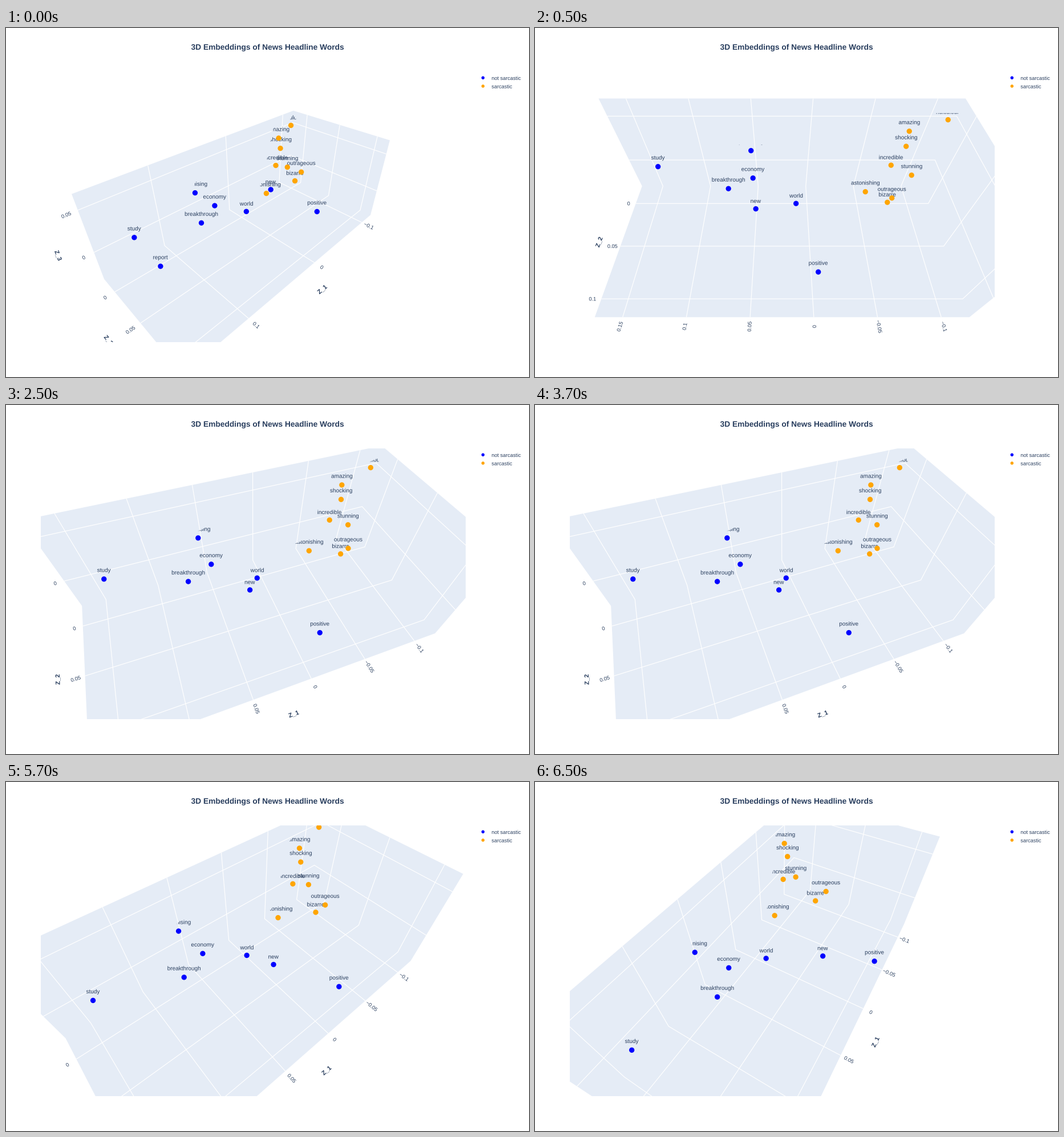
A matplotlib script for the animation above (8 s loop, 917x611 px).

```python
import math

import matplotlib.pyplot as plt
import numpy as np
from matplotlib.animation import FuncAnimation
from matplotlib.patches import Circle, PathPatch, Polygon
from matplotlib.path import Path
from matplotlib.textpath import TextPath
from matplotlib.transforms import Affine2D

WIDTH, HEIGHT, DPI = 917, 611, 64
INK, WALL = "#2a3f5f", "#e5ecf6"
BLUE, ORANGE = "#0000ff", "#ffa500"

# Viewport of the 3D scene and a pinhole camera with a 45 degree field of view.
LEFT, RIGHT, TOP, BOTTOM = 61, 806, 76.3, 550
VIEWPORT = np.array([(LEFT, TOP), (RIGHT, TOP), (RIGHT, BOTTOM), (LEFT, BOTTOM)])
MIDDLE = np.array([433.2, 312.9])
FOCAL = (BOTTOM - TOP) / 2 / math.tan(math.radians(22.5))

# Space is measured in tick steps of 0.05 from the middle of the box.
TICK = 0.05
HALF = np.array([2.94, 1.385, 1.04])
DATA_MIDDLE = np.array([0.498, 0.915, 0.296])
STEPS_PER_EYE_UNIT = 1 / 0.3095

# Each grid line bends over two back planes: signs of its three corners.
AXES = [("Z_1", [(0, -1, 1), (0, -1, -1), (0, 1, -1)]),
        ("Z_2", [(-1, 0, 1), (-1, 0, -1), (1, 0, -1)]),
        ("Z_3", [(-1, 1, 0), (-1, -1, 0), (1, -1, 0)])]
OUTLINE = [(1, -1, 1), (-1, -1, 1), (-1, 1, 1), (-1, 1, -1), (1, 1, -1), (1, -1, -1)]

SARCASTIC = dict(
    ridiculous=(-2.771, -1.302, 0.693), amazing=(-2.139, -1.184, 0.549),
    shocking=(-2.151, -1.118, 0.276), incredible=(-2.016, -1.137, -0.193),
    stunning=(-2.434, -1.061, -0.378), outrageous=(-1.715, -0.057, 0.146),
    bizarre=(-1.780, -0.272, -0.221), astonishing=(-1.703, -1.173, -0.977))
SINCERE = dict(
    promising=(0.568, -1.294, 0.022), economy=(0.504, -0.683, -0.061),
    breakthrough=(0.946, -0.612, -0.255), world=(-0.251, -0.476, -0.502),
    new=(0.320, 0.768, 0.919), positive=(-0.458, 1.298, 0.304),
    study=(2.249, -1.029, -0.124), report=(2.770, 1.085, 0.990))

fig = plt.figure(figsize=(WIDTH / DPI, HEIGHT / DPI), dpi=DPI, facecolor="white")
ax = fig.add_axes([0, 0, 1, 1])
ax.set(xlim=(0, WIDTH), ylim=(HEIGHT, 0))
ax.axis("off")


def add(patch, region=VIEWPORT):
    ax.add_patch(patch)
    patch.set_clip_path(Path(np.vstack([region, region[:1]])), ax.transData)
    return patch


def text(x, y, string, size, ha="center", va="center", angle=0, weight="normal"):
    """Outline text placed by its ink box."""
    path = TextPath((0, 0), string, size=size,
                    prop={"family": "Liberation Sans", "weight": weight})
    box = path.get_extents()
    dx = {"left": 0, "center": (box.x0 + box.x1) / 2}[ha]
    dy = {"baseline": 0, "bottom": box.y0, "center": (box.y0 + box.y1) / 2}[va]
    place = Affine2D().translate(-dx, -dy).scale(1, -1).rotate_deg(-angle).translate(x, y)
    return PathPatch(place.transform_path(path), fc=INK, lw=0, zorder=3)


def dot(x, y, color, size):
    return Circle((x, y), size / 2, fc=color, lw=0, zorder=4)


def readable_angle(start, end):
    """Screen direction in degrees, folded so that text is not upside down."""
    dx, dy = end - start
    return (math.degrees(math.atan2(-dy, dx)) + 80) % 180 - 80


def cut(polygon, side):
    """Part of the polygon where side(points) is not negative."""
    values, kept = side(polygon), []
    for i, (a, va) in enumerate(zip(polygon, values)):
        j = (i + 1) % len(polygon)
        if va >= 0:
            kept.append(a)
        if va * values[j] < 0:
            kept.append(a + (polygon[j] - a) * va / (va - values[j]))
    return np.array(kept).reshape(-1, 2)


class Camera:
    """Looks from the eye at the middle of the box, with z upwards."""

    def __init__(self, eye):
        self.eye = np.array(eye) * STEPS_PER_EYE_UNIT
        self.distance = np.linalg.norm(self.eye)
        self.forward = -self.eye / self.distance
        right = np.cross(self.forward, (0, 0, 1))
        self.right = right / np.linalg.norm(right)
        self.up = np.cross(self.right, self.forward)

    def depth(self, points):
        return (points - self.eye) @ self.forward

    def project(self, points):
        rel = np.asarray(points) - self.eye
        flat = np.stack([rel @ self.right, -(rel @ self.up)], axis=-1)
        return MIDDLE + FOCAL * flat / (rel @ self.forward)[..., None]

    def unhidden(self, point):
        """Screen region where a flat label at the point is before the walls."""
        region, origin = VIEWPORT, self.project(point)
        scale = self.depth(point) / FOCAL
        for k in range(3):
            slope = scale * np.array([self.right[k], -self.up[k]])
            margin = point[k] + HALF[k]
            region = cut(region, lambda p: margin + (p - origin) @ slope)
        return region


def draw_axis(cam, k, x_step):
    name, signs = AXES[k]
    corners = np.array(signs) * HALF
    outward = (np.array(signs[2]) - signs[1]) / 2
    unit = np.eye(3)[k]
    # seen square on, the upright axis moves to the side outside the viewport
    labelled = k < 2 or abs(cam.eye[0]) > 1e-9
    drawn = []
    for n in range(-4, 5, x_step if k == 0 else 1):
        at = n - DATA_MIDDLE[k]
        if abs(at) > HALF[k]:
            continue
        line = corners + at * unit
        drawn.append(add(PathPatch(Path(cam.project(line)), fill=False, ec="white",
                                   lw=1.2 * 72 / DPI, zorder=2)))
        if labelled:
            end, spot = cam.project([line[2], line[2] + 0.028 * cam.distance * outward])
            number = f"{n * TICK:g}".replace("-", "−")
            drawn.append(add(text(*spot, number, 9.17, angle=readable_angle(end, spot))))
    if labelled:
        spot = cam.project(corners[2] + 0.08 * cam.distance * outward)
        angle = readable_angle(*cam.project([corners[2], corners[2] + 0.1 * unit]))
        drawn.append(add(text(*spot, name, 10.8, angle=angle, weight="bold")))
    return drawn


def draw_words(cam, words, color):
    drawn = []
    for word, place in words.items():
        point = np.array(place)
        x, y = cam.project(point)
        drawn.append(add(dot(x, y, color, 9.3)))
        region = cam.unhidden(point)
        if len(region) > 2:
            drawn.append(add(text(x, y - 10.3, word, 10, va="bottom"), region))
    return drawn


def eye_at(i):
    """Default position first, then jumps of 20 degrees every four frames."""
    if i == 0:
        return 1.25, 1.25, 1.25
    turn = math.radians(20 * ((i - 1) // 4))
    return math.sin(turn), math.cos(turn), 1.25


ax.add_patch(text(458.5, 38, "3D Embeddings of News Headline Words", 13.76,
                  va="baseline", weight="bold"))
for y, name, color in [(87.2, "not sarcastic", BLUE), (101.8, "sarcastic", ORANGE)]:
    ax.add_patch(dot(836.3, y, color, 5.5))
    ax.add_patch(text(851.3, y + 3.7, name, 9.17, ha="left", va="baseline"))

scene = []


def update(i):
    while scene:
        scene.pop().remove()
    cam = Camera(eye_at(i))
    scene.append(add(Polygon(cam.project(np.array(OUTLINE) * HALF), fc=WALL, lw=0, zorder=1)))
    for k in range(3):
        scene.extend(draw_axis(cam, k, x_step=2 if i == 0 else 1))
    scene.extend(draw_words(cam, SINCERE, BLUE))
    scene.extend(draw_words(cam, SARCASTIC, ORANGE))
    return scene


anim = FuncAnimation(fig, update, frames=16, interval=500,
                     init_func=lambda: update(0), repeat=True, repeat_delay=0)
plt.show()
```
